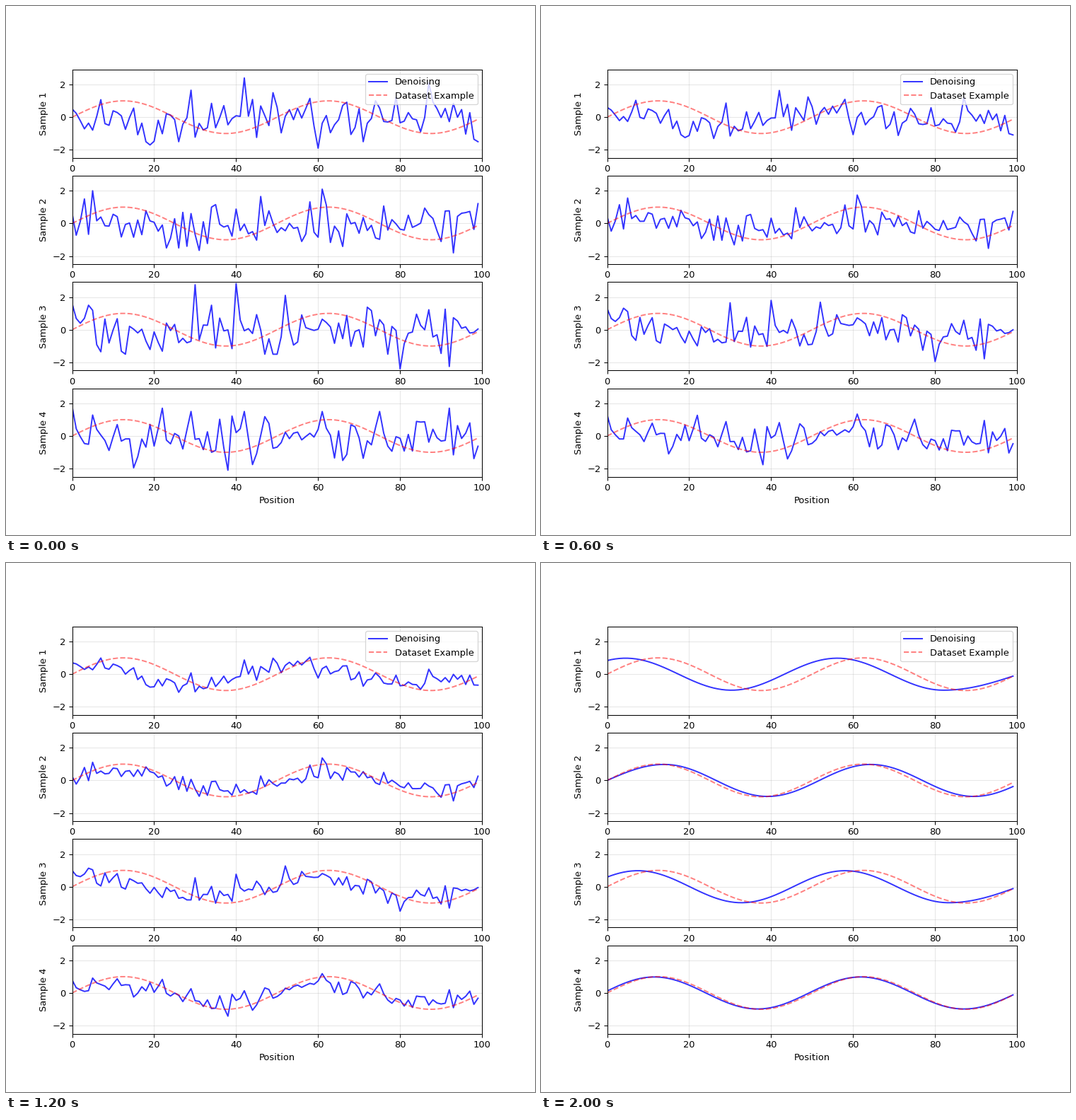
A matplotlib script that plays this animation: 748x748 px, repeating every 2.2 s.

```python
import numpy as np
import matplotlib.pyplot as plt
from matplotlib.animation import FuncAnimation

STEPS = 11
INTERVAL = 200
POS = np.arange(100)

# Tallest spikes of the starting noise
SPIKES = [
    {0: 0.5, 19: -1.7, 29: 1.65, 42: 2.4, 60: -1.9, 87: 2.1},
    {0: 0.6, 5: 2.0, 31: -1.65, 46: 1.65, 61: 2.1, 93: -1.8},
    {0: 1.6, 30: 2.75, 40: 2.82, 52: 2.1, 80: -2.4, 92: -2.25},
    {0: 1.8, 15: -1.95, 22: 1.7, 38: -2.1, 44: -1.75, 92: 1.7},
]

# Clean waves: start value, first peak, last trough, end value
WAVES = [
    (0.85, 4.5, 82, -0.12),
    (0.0, 14, 89.5, -0.38),
    (0.6, 7.5, 83.3, -0.12),
    (0.12, 11.5, 87, -0.12),
]


def make_noise(spikes, rng):
    y = np.clip(rng.normal(0, 0.8, POS.size), -1.5, 1.5)
    y[list(spikes)] = list(spikes.values())
    return y


def make_wave(start, peak, trough, end):
    phase = [np.arcsin(start), np.pi / 2, 3.5 * np.pi,
             4 * np.pi + np.arcsin(end)]
    return 0.98 * np.sin(np.interp(POS, [0, peak, trough, 99], phase))


rng = np.random.default_rng(7)
noise = [make_noise(s, rng) for s in SPIKES]
clean = [make_wave(*w) for w in WAVES]
example = np.sin(2 * np.pi * POS / 50)

fig, axes = plt.subplots(4, 1, figsize=(8, 8), dpi=93.5)
lines = []
for i, ax in enumerate(axes):
    line, = ax.plot(POS, noise[i], "b-", alpha=0.8, label="Denoising")
    ax.plot(POS, example, "r--", alpha=0.5, label="Dataset Example")
    ax.set_xlim(0, 100)
    ax.set_ylim(-2.5, 2.92)
    ax.set_yticks([-2, 0, 2])
    ax.set_ylabel(f"Sample {i + 1}")
    ax.grid(True, alpha=0.3)
    lines.append(line)
axes[0].legend(loc="upper right")
axes[-1].set_xlabel("Position")


def update(step):
    t = step / (STEPS - 1)
    for line, start, end in zip(lines, noise, clean):
        line.set_ydata((1 - t) * start + t * end)
    return lines


anim = FuncAnimation(fig, update, frames=STEPS, interval=INTERVAL,
                     repeat=True, repeat_delay=0)
plt.show()
```
